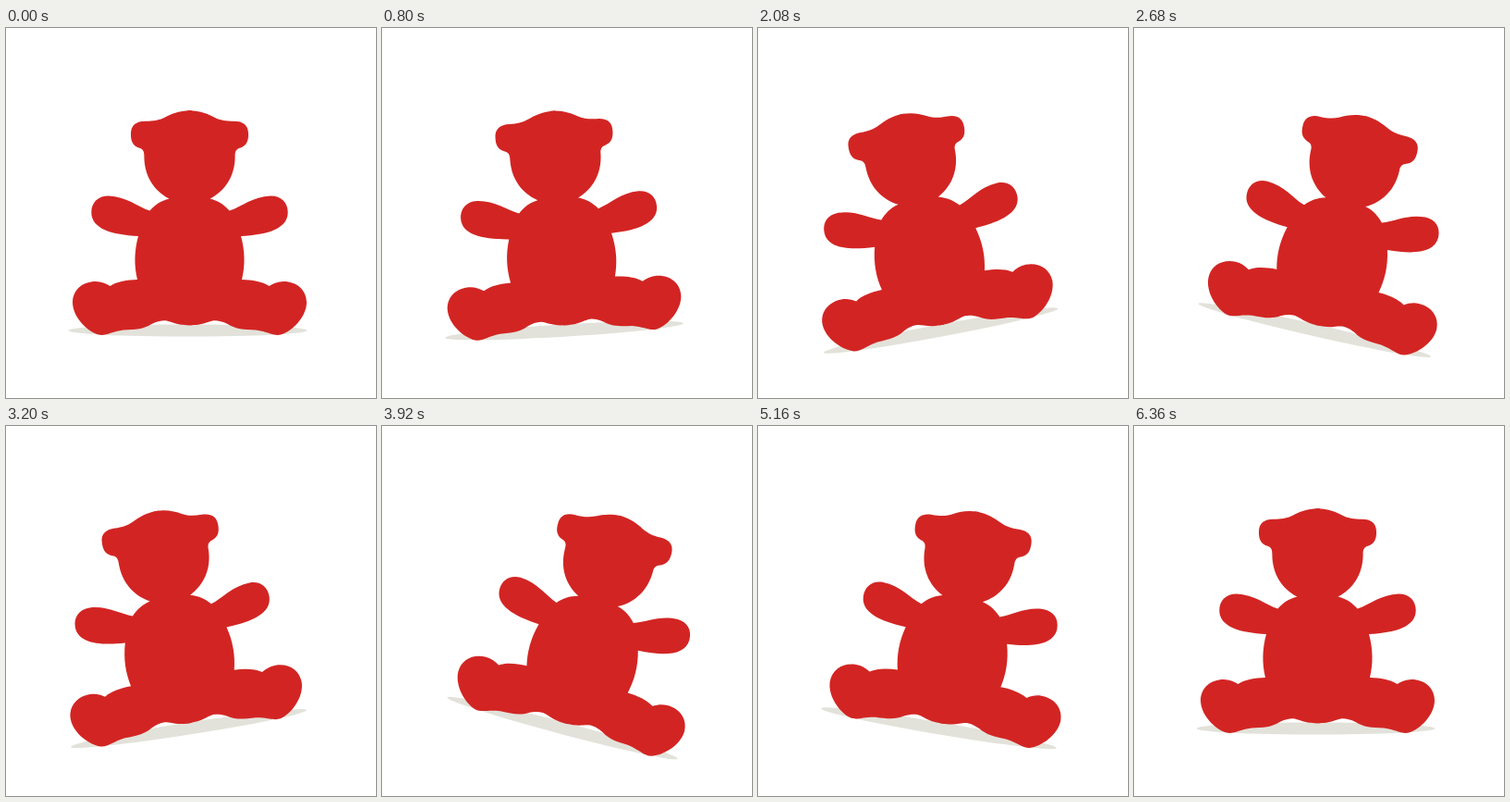
Write an HTML page that moves like this. It is 400 px wide and 400 px high and loops after 6720 ms.

```html
<!DOCTYPE html>
<html lang="en">
<head>
<meta charset="utf-8">
<title>Rocking bear</title>
<style>
  html, body { margin: 0; width: 100%; height: 100%; overflow: hidden; background: #fff; }
  svg { display: block; width: 100vw; height: 100vh; }
</style>
</head>
<body>
<svg viewBox="0 0 400 400">
  <g id="bear">
    <ellipse cx="196.5" cy="327" rx="129" ry="6.6" fill="#e2e2da"/>
    <g fill="#d22523">
      <path id="half" d="M196 89.3 H198.5
        C210 89.3 219 93.5 225 96.5 C232 100 238 100.7 246 100.7
        C256 100.5 262 105 262 114 C262.3 122 260 127 253.5 129.6
        C248.5 131 247.5 134 247.6 139
        C247.5 160 237 176 220.5 184.6
        C230 187 236 191.500 241.5 197.600
        C255 193 267 182 286 181.400
        C298 181.400 304.700 189 304.700 199.500
        C304.500 217 283 223.500 254 225
        C258.600 242 258.500 257 255 272
        C266 272.300 277 274 284.500 279
        C289 276.200 294 274 300 274
        C314 274 325 283 325 297
        C324.500 313 309 328 297 331.600
        C289 333.300 284 328.500 270 326.500
        C257 326.200 248 325.500 240 320.300
        C234 317.300 230 316.300 225 316.300
        C217 317.500 214 321.300 198.500 321.300 H196 Z"/>
      <use href="#half" transform="matrix(-1 0 0 1 397 0)"/>
    </g>
  </g>
</svg>
<script>
  const LOOP = 6720, STEP = 40, PIVOT = '197.5 321';
  // Turning points of the swing: [ms, degrees]
  const swing = [
    [240, 0], [316, 0.5], [936, -4], [1556, 7.9], [2176, -11.8], [2796, 15.1],
    [3416, -17.8], [4036, 17.9], [4656, -17.1], [5276, 12], [5896, -4.6], [6380, 0]
  ];
  const bear = document.getElementById('bear');
  const ease = u => (1 - Math.cos(Math.PI * u)) / 2;

  function angle(t) {
    const i = swing.findIndex(([ms]) => t < ms);
    if (i < 1 || t >= 6360) return 0;
    const [t0, a0] = swing[i - 1], [t1, a1] = swing[i];
    return a0 + (a1 - a0) * ease((t - t0) / (t1 - t0));
  }

  const start = performance.now();
  function draw() {
    const t = Math.max(0, performance.now() - start) % LOOP;
    const a = angle(Math.floor(t / STEP) * STEP);
    bear.setAttribute('transform', `rotate(${a.toFixed(3)} ${PIVOT})`);
    requestAnimationFrame(draw);
  }
  draw();
</script>
</body>
</html>
```
